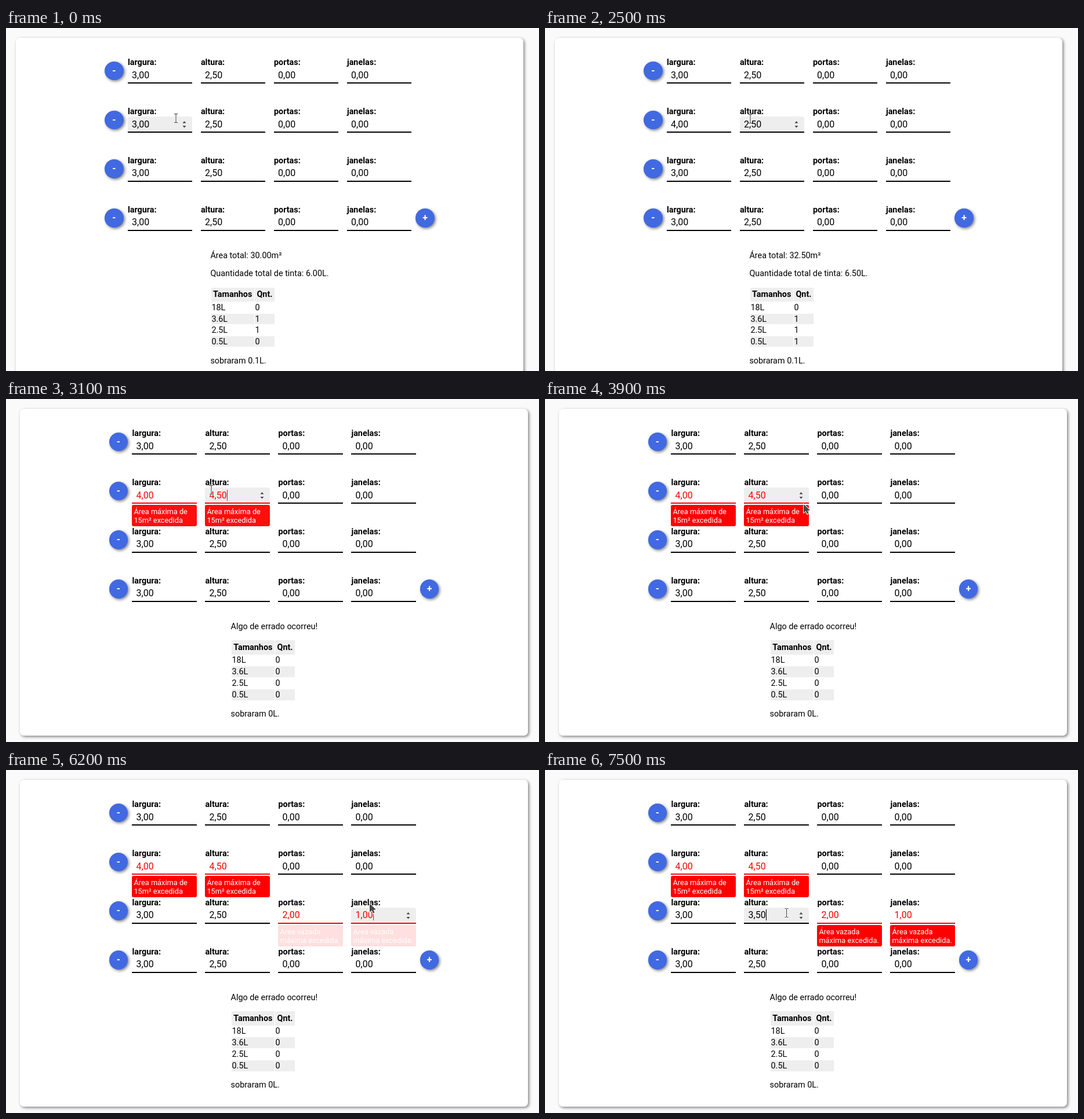
Animation, 919 px wide and 593 px high, one loop 8 s. Source, as an HTML page:

```html
<!DOCTYPE html>
<html lang="pt">
<head>
<meta charset="utf-8">
<title>Calculadora de tinta</title>
<style>
html, body { margin: 0; width: 100%; height: 100%; overflow: hidden; background: #fafafa; }
body { position: relative; font: 14.4px Roboto, sans-serif; color: #000; }
#page, #page * { position: absolute; box-sizing: border-box; }
#page { top: 0; width: 919px; height: 593px; }
.card { left: 16.6px; top: 16.5px; width: 875.6px; background: #fff; border-radius: 7px; box-shadow: 2px 2px 5px gray; }
.t { white-space: pre; line-height: normal; }
.b { font-weight: 700; }
.v { font-size: 16px; }
.btn { width: 32.7px; height: 32.7px; border-radius: 50%; background: #4169e1; color: #fff;
  font: 700 16px/32.7px Roboto, sans-serif; text-align: center; box-shadow: 2px 2px 5px gray; }
.field { width: 111.5px; height: 28px; border-bottom: 2px solid; }
.on { background: #eee; border-radius: 4px 4px 0 0; }
.caret { width: 1px; height: 19px; background: currentColor; }
.error { width: 111.5px; height: 37px; padding: 4px 3px 0; border-radius: 3px; background: red; color: #fff;
  font-size: 12.8px; line-height: 15px; white-space: pre; }
.cell { background: #eee; }
.head { text-align: center; font-weight: 700; }
svg { position: absolute; left: 0; top: 0; overflow: visible; fill: none; }
</style>
</head>
<body>
<div id="page"></div>
<svg id="pointer" width="1" height="1"></svg>
<script>
const LOOP = 8000, STEP = 100, FIELD_W = 111.5;
const LABELS = ['largura:', 'altura:', 'portas:', 'janelas:'];
const VALUE_BASE = [87, 172, 256, 341];
const SIZES = ['18L', '3.6L', '2.5L', '0.5L'];
const ERRORS = { 1: 'Área máxima de\n15m² excedida', 2: 'Área vazada\nmáxima excedida.' };

// Step tracks: [time, value], each value holds until the next
const FOCUS = [[0, ''], [100, '10'], [2400, '11'], [4600, '22'], [6000, '23'], [7100, '21']];
const CARET = [[0, 0], [400, 1], [1000, 0], [1400, 1], [1900, 0], [2400, 1], [2500, 0], [2900, 1],
  [3300, 0], [3700, 1], [3900, 0], [4600, 1], [6900, 0], [7100, 1]];
const FADE = {
  1: [[0, 0], [2900, .63], [3000, .83], [3100, .94], [3300, 1]],
  2: [[0, 0], [6200, .12], [6300, .5], [6500, .92], [6600, .98], [6700, 1]]
};
const VALUES = {
  10: [[0, '3,00'], [1400, '4,00']],
  11: [[0, '2,50'], [2900, '4,50']],
  22: [[0, '0,00'], [5000, '1,50'], [5200, '2,00']],
  23: [[0, '0,00'], [6200, '1,00']],
  21: [[0, '2,50'], [7500, '3,50']]
};
const POINTER = [[0, 293, 156], [100, 288, 154], [200, 278, 152],
  [1900, 286, 158], [2000, 300, 170], [2100, 318, 181], [2200, 334, 172], [2300, 347, 160], [2400, 353, 157], [2500, 354, 157],
  [3600, 375, 154], [3700, 402, 160], [3800, 428, 170], [3900, 446, 182], [4000, 468, 204], [4100, 492, 228],
  [4200, 512, 246], [4300, 526, 256], [4400, 531, 260], [4700, 531, 262], [4800, 531, 257], [4900, 531, 253], [5000, 531.5, 252],
  [5700, 548, 258], [5800, 585, 254], [5900, 612, 242], [6000, 627, 231],
  [6600, 600, 226], [6700, 540, 239], [6900, 430, 241], [7100, 418, 246], [7200, 416.5, 247]];
const RESULTS = [
  [0, { lines: ['Área total: 30.00m²', 'Quantidade total de tinta: 6.00L.'], counts: [0, 1, 1, 0] }],
  [1400, { lines: ['Área total: 32.50m²', 'Quantidade total de tinta: 6.50L.'], counts: [0, 1, 1, 1] }],
  [2900, { lines: ['Algo de errado ocorreu!'], counts: [0, 0, 0, 0], failed: true }]
];

const last = (track, t) => track.filter(k => k[0] <= t).pop();
const at = (track, t) => last(track, t)[1];
const fieldX = col => 209.9 + 126 * col;
const fieldY = row => 68 + 85 * row;
const box = (cls, x, y, body = '', css = '') =>
  `<div class="${cls}" style="left:${x}px;top:${y}px;${css}">${body}</div>`;
// Text placed by its baseline
const text = (s, x, base, cls = '', ascent = 13) => box('t ' + cls, x, base - ascent, s);

function spinner(x, y) {
  return `<svg width="1" height="1" fill="#444"><path fill="#444" d="M${x - 3} ${y + 11.5}h6l-3-3.5zM${x - 3} ${y + 16}h6l-3 3.5z"/></svg>`;
}

function field(row, col, t, px, py) {
  const id = `${row}${col}`, x = fieldX(col), y = fieldY(row);
  const value = VALUES[id] ? at(VALUES[id], t) : ['3,00', '2,50', '0,00', '0,00'][col];
  const over = px >= x && px <= x + FIELD_W && py >= y && py < y + 28;
  const focused = at(FOCUS, t) === id;
  const invalid = FADE[row] && (col < 2) === (row === 1);
  const alpha = invalid ? at(FADE[row], t) : 0;
  const ink = alpha ? 'color:red;' : '';
  let html = text(LABELS[col], x, 64 + 85 * row, 'b');
  html += box('field' + (over || focused ? ' on' : ''), x, y, '', ink + `border-color:${alpha ? 'red' : '#000'}`);
  html += box('t v', x + 7.2, VALUE_BASE[row] - 15, value, ink);
  if (over || focused) html += spinner(x + 97.6, y);
  if (focused && at(CARET, t)) html += box('caret', x + 37.3, VALUE_BASE[row] - 15, '', ink);
  if (alpha) html += box('error', x, y + 30, ERRORS[row], `opacity:${alpha}`);
  return { html, over };
}

function results({ lines, counts, failed }) {
  const x = failed ? 380 : 352.4;
  const headBase = failed ? 434 : 465;
  const rows = failed ? [456, 476, 496, 516] : [488, 508, 527, 547];
  const shade = (y, h, a = '', b = '') =>
    box('cell head', x + 1.1, y, a, `width:74.5px;height:${h}px;line-height:${h}px`) +
    box('cell head', x + 76.5, y, b, `width:34.1px;height:${h}px;line-height:${h}px`);
  let html = lines.map((s, i) => text(s, x, 398 + 31 * i)).join('');
  const top = headBase - (failed ? 17 : 16);
  html += shade(top, headBase + 8 - top) +
    box('t head', x + 1.1, headBase - 13, 'Tamanhos', 'width:74.5px') +
    box('t head', x + 76.5, headBase - 13, 'Qnt.', 'width:34.1px');
  rows.forEach((base, i) => {
    if (i % 2) html += shade(base - 14, failed ? 19 : 18);
    html += text(SIZES[i], x + 2, base) + text(counts[i], x + 77, base);
  });
  return html + text(`sobraram ${failed ? '0' : '0.1'}L.`, x, failed ? 549 : 580);
}

const IBEAM = 'M-3-7.5H-1L0-7 1-7.5H3M0-7V7M-3 7.5H-1L0 7 1 7.5H3';
const ARROW = 'M0 0V14.5L3.7 11.8 6.3 16.8 8.6 15.6 6.5 10.9 11 10.3Z';
function pointer(x, y, beam) {
  const d = beam ? IBEAM : ARROW;
  return `<g transform="translate(${x} ${y})"><path d="${d}" stroke="#fff" stroke-width="${beam ? 2.6 : 2}"/>` +
    `<path d="${d}" ${beam ? 'stroke="#333"' : 'fill="#464646"'}/></g>`;
}

const page = document.getElementById('page'), mouse = document.getElementById('pointer');

function render(t) {
  const result = at(RESULTS, t), dx = result.failed ? 7.5 : 0;
  const [, px, py] = last(POINTER, t);
  let beam = false;
  let html = box('card', 16.6, 16.5, '', `height:${result.failed ? 565.5 : 620}px`);
  for (let row = 0; row < 4; row++) {
    html += box('btn', 170, 57.8 + 84.8 * row, '-');
    for (let col = 0; col < 4; col++) {
      const f = field(row, col, t, px - dx, py);
      html += f.html;
      beam = beam || f.over;
    }
  }
  html += box('btn', 706.3, 312.2, '+') + results(result);
  page.style.left = dx + 'px';
  page.innerHTML = html;
  mouse.innerHTML = pointer(px, py, beam);
}

const start = performance.now();
let shown = -1;
function tick() {
  const t = Math.floor((performance.now() - start) % LOOP / STEP) * STEP;
  if (t !== shown) render(shown = t);
  requestAnimationFrame(tick);
}
tick();
</script>
</body>
</html>
```
